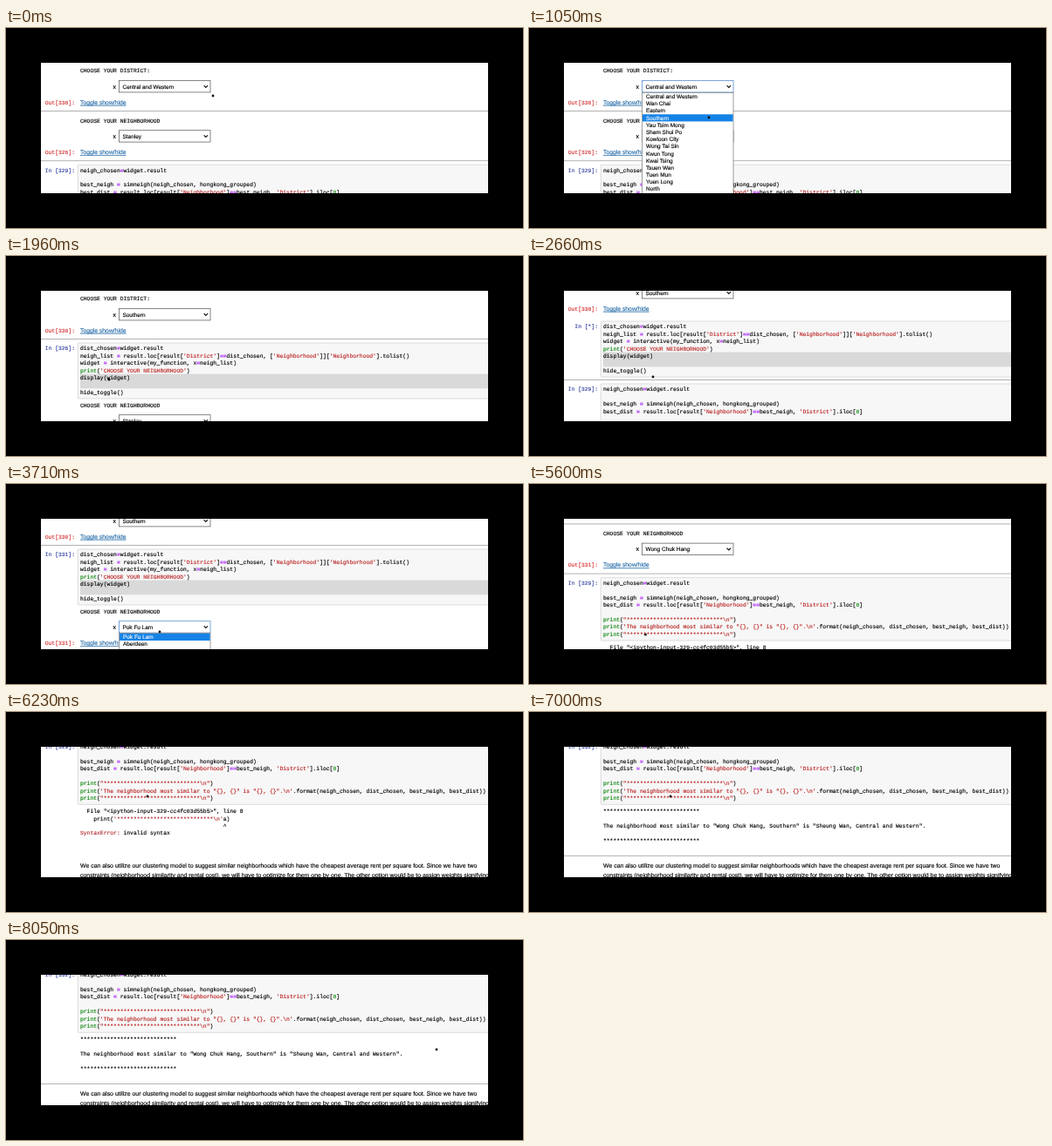
These frames come from a looping animation (592 px wide and 230 px high, 8.12 s). An HTML page:

```html
<!DOCTYPE html>
<html lang="en">
<head>
<meta charset="utf-8">
<title>Notebook walkthrough</title>
<style>
html, body { margin: 0; width: 100%; height: 100%; overflow: hidden; background: #000; }
svg { display: block; width: 592px; height: 230px; }
text, tspan { fill: currentColor; stroke: currentColor; stroke-width: .14px; white-space: pre; text-rendering: geometricPrecision; }
text { color: #000; }
.m { font: 6.35px "Liberation Mono", monospace; }
.s { font: 6.93px "Liberation Sans", Arial, sans-serif; }
.o { font: 6.45px "Liberation Sans", Arial, sans-serif; }
.l { font: 6.8px "Liberation Sans", Arial, sans-serif; color: #296eaa; text-decoration: underline; }
.str { color: #ba2121; }
.op { color: #aa22ff; font-weight: bold; }
.fn { color: #008000; }
.num { color: #008800; }
.err { color: #b22b31; }
.in { color: #303f9f; }
.out { color: #d32f2f; }
</style>
</head>
<body>
<svg viewBox="0 0 592 230">
  <clipPath id="view"><rect x="40" y="40" width="512" height="150"/></clipPath>
  <rect width="592" height="230" fill="#000"/>
  <g clip-path="url(#view)">
    <rect x="40" y="40" width="512" height="150" fill="#fff"/>
    <g id="page"></g>
    <circle id="mouse" r="1.4" fill="#111"/>
  </g>
</svg>
<script>
const LOOP = 8120, STEP = 70, LINE = 8.4, LEFT = 85, CODE_H = 65, OUT_H = 57.2;
const stars = '*'.repeat(29);

const districts = ['Central and Western', 'Wan Chai', 'Eastern', 'Southern', 'Yau Tsim Mong',
  'Sham Shui Po', 'Kowloon City', 'Wong Tai Sin', 'Kwun Tong', 'Kwai Tsing', 'Tsuen Wan',
  'Tuen Mun', 'Yuen Long', 'North', 'Tai Po'];
const areas = ['Pok Fu Lam', 'Aberdeen', 'Ap Lei Chau', 'Wong Chuk Hang'];

const listCode = [
  "dist_chosen=widget.result",
  "neigh_list = result.loc[result['District']==dist_chosen, ['Neighborhood']]['Neighborhood'].tolist()",
  "widget = interactive(my_function, x=neigh_list)",
  "print('CHOOSE YOUR NEIGHBORHOOD')",
  "display(widget)",
  "",
  "hide_toggle()"
];
const bestCode = [
  "neigh_chosen=widget.result",
  "",
  "best_neigh = simneigh(neigh_chosen, hongkong_grouped)",
  "best_dist = result.loc[result['Neighborhood']==best_neigh, 'District'].iloc[0]",
  "",
  `print("${stars}\\n")`,
  `print('The neighborhood most similar to "{}, {}" is "{}, {}".\\n'.format(neigh_chosen, dist_chosen, best_neigh, best_dist))`,
  `print("${stars}\\n")`
];
const note = [
  'We can also utilize our clustering model to suggest similar neighborhoods which have the cheapest average rent per square foot. Since we have two',
  'constraints (neighborhood similarity and rental cost), we will have to optimize for them one by one. The other option would be to assign weights signifying'
];

const T = { open1: 490, pick1: 1260, show: 1820, run1: 2590, done1: 2800, open2: 3290,
  pick2: 4130, hide: 4830, focus: 6370, run2: 6650, done2: 6790 };

// time, x, y
const path = [
  [0, 237, 78], [140, 237, 78], [490, 229, 67], [560, 229, 67], [1050, 206, 103], [1260, 206, 103],
  [1750, 112, 143], [1820, 112, 143], [2310, 142, 139], [2870, 142, 139], [3290, 229, 164],
  [3360, 229, 164], [3640, 176, 170], [3780, 176, 170], [4060, 150, 199], [4340, 150, 199],
  [4410, 148, 196], [4550, 148, 196], [4760, 130, 182], [5460, 130, 182], [6160, 162, 97],
  [7420, 162, 97], [7980, 493, 126], [LOOP, 493, 126]
];

const esc = s => s.replace(/&/g, '&amp;').replace(/</g, '&lt;');
const span = (cls, s) => `<tspan class="${cls}">${esc(s)}</tspan>`;
const raw = (cls, x, y, s, more = '') => `<text class="${cls}" x="${x}" y="${y}" ${more}>${s}</text>`;
const text = (cls, x, y, s, more) => raw(cls, x, y, esc(s), more);
const rect = (x, y, w, h, fill, more = '') =>
  `<rect x="${x}" y="${y}" width="${w}" height="${h}" fill="${fill}" ${more}/>`;
const ramp = (t, a, b) => {
  const p = Math.min(1, Math.max(0, (t - a) / (b - a)));
  return p * p * (3 - 2 * p);
};

function paint(line) {
  const re = /('[^']*'|"[^"]*")|(\bprint\b)|(=+)|(\b\d+\b)|([^'"=\d]+?(?=\bprint\b|['"=\d]|$)|.)/g;
  return line.replace(re, (all, str, fn, op, num) =>
    str ? span('str', all) : fn ? span('fn', all) : op ? span('op', all) : num ? span('num', all) : esc(all));
}

const label = (kind, y, n) =>
  text('m ' + kind, 79, y, (kind === 'in' ? 'In [' : 'Out[') + n + ']:', 'text-anchor="end"');

function codeBox(y, n, lines, band) {
  const first = y + 12.8;
  let s = rect(82.2, y + 4.5, 500, (lines.length - 1) * LINE + 13.6, '#f7f7f7',
    'stroke="#cfcfcf" stroke-width=".7" rx="1"');
  if (band) s += rect(85, first + 3.2 * LINE + .4, 480, 2 * LINE, '#d9d9d9');
  lines.forEach((line, i) => { s += raw('m', LEFT, first + i * LINE, paint(line)); });
  return s + label('in', first, n);
}

function widget(y, title, value, n, open) {
  return text('m', LEFT, y + 13, title) +
    text('s', 126, y + 31.4, 'x', 'text-anchor="end"') +
    rect(129.5, y + 22.2, 104.5, 13.4, '#fff', `stroke="${open ? '#5b8fcf' : '#666'}" stroke-width=".8"`) +
    text('o', 133.5, y + 31.4, value) +
    `<path d="M226.6 ${y + 27.8}l2.2 2.2 2.2-2.2" fill="none" stroke="#111" stroke-width="1.2"/>` +
    label('out', y + 49.2, n) + text('l', LEFT, y + 49.5, 'Toggle show/hide');
}

function popup(y, items, hot) {
  const top = y + 36, pitch = 8.19;
  let s = rect(129.5, top, 104.5, items.length * pitch + 1, '#fff', 'stroke="#777" stroke-width=".7"');
  items.forEach((item, i) => {
    const iy = top + .4 + i * pitch;
    if (i === hot) s += rect(130, iy, 103.6, pitch, '#1583e6');
    s += text('o', 134, iy + 6.3, item, i === hot ? 'style="color:#fff"' : '');
  });
  return s;
}

function failure(y) {
  const row = i => y + 86.8 + i * LINE;
  return text('m', LEFT, row(0), '  File "<ipython-input-329-cc4fc03d55b5>", line 8') +
    raw('m', LEFT, row(1), "    print(" + span('err', `'${stars}\\n'`) + 'a)') +
    text('m', LEFT, row(2), ' '.repeat(43) + '^') +
    raw('m', LEFT, row(3), span('err', 'SyntaxError:') + ' invalid syntax');
}

function answer(y) {
  return [stars, 'The neighborhood most similar to "Wong Chuk Hang, Southern" is "Sheung Wan, Central and Western".', stars]
    .map((s, i) => text('m', LEFT, y + 86.8 + i * 2 * LINE, s)).join('');
}

function mouseAt(t) {
  let i = 1;
  while (i < path.length - 1 && path[i][0] <= t) i++;
  const a = path[i - 1], b = path[i], p = ramp(t, a[0], b[0]);
  return [a[1] + (b[1] - a[1]) * p, a[2] + (b[2] - a[2]) * p];
}

function draw(t) {
  const [mx, my] = mouseAt(t);
  const scroll = (t >= T.run1 ? 25 : 0) + 49.15 * (ramp(t, 5460, 5740) + ramp(t, 5880, 6160));
  const open1 = t >= T.open1 && t < T.pick1, open2 = t >= T.open2 && t < T.pick2;
  const shown = t >= T.show && t < T.hide;
  const busy = t >= T.run1 && t < T.done1;
  const hot = (y, n) => Math.min(n - 1, Math.max(0, Math.floor((my - y - 36.4) / 8.19)));

  const a = 38.3 - scroll, b = a + OUT_H;
  const out = b + (shown ? CODE_H : 0);
  const c = out + (busy ? 7 : OUT_H), d = c + 136;

  let s = widget(a, 'CHOOSE YOUR DISTRICT:', t < T.pick1 ? districts[0] : districts[3], 330, open1);
  const nB = t < T.run1 ? 326 : busy ? '*' : 331;
  if (shown) s += codeBox(b, nB, listCode, true);
  if (!busy) {
    const area = t < T.run1 ? 'Stanley' : t < T.pick2 ? areas[0] : areas[3];
    s += widget(out, 'CHOOSE YOUR NEIGHBORHOOD', area, nB, open2);
  }
  s += codeBox(c, t < T.run2 ? 329 : t < T.done2 ? '*' : 332, bestCode);
  if (t < T.run2) s += failure(c);
  else if (t >= T.done2) s += answer(c);
  note.forEach((line, i) => { s += text('s', LEFT, d + 14 + i * 10.4, line); });

  // Border of the selected cell
  const onC = t >= T.run1 && t < T.open2 || t >= T.focus && t < T.run2;
  const [top, bottom] = t >= T.run2 ? [d, d + 60] : onC ? [c, d] : [b, c];
  s += rect(20, top, 560, bottom - top, 'none', 'stroke="#ababab" stroke-width=".9"');

  if (open1) s += popup(a, districts, hot(a, districts.length));
  if (open2) s += popup(out, areas, hot(out, areas.length));

  page.innerHTML = s;
  mouse.setAttribute('cx', mx);
  mouse.setAttribute('cy', my);
}

const page = document.getElementById('page'), mouse = document.getElementById('mouse');
let last = -1;
function tick() {
  const t = Math.floor(performance.now() % LOOP / STEP) * STEP;
  if (t !== last) draw(last = t);
  requestAnimationFrame(tick);
}
tick();
</script>
</body>
</html>
```
